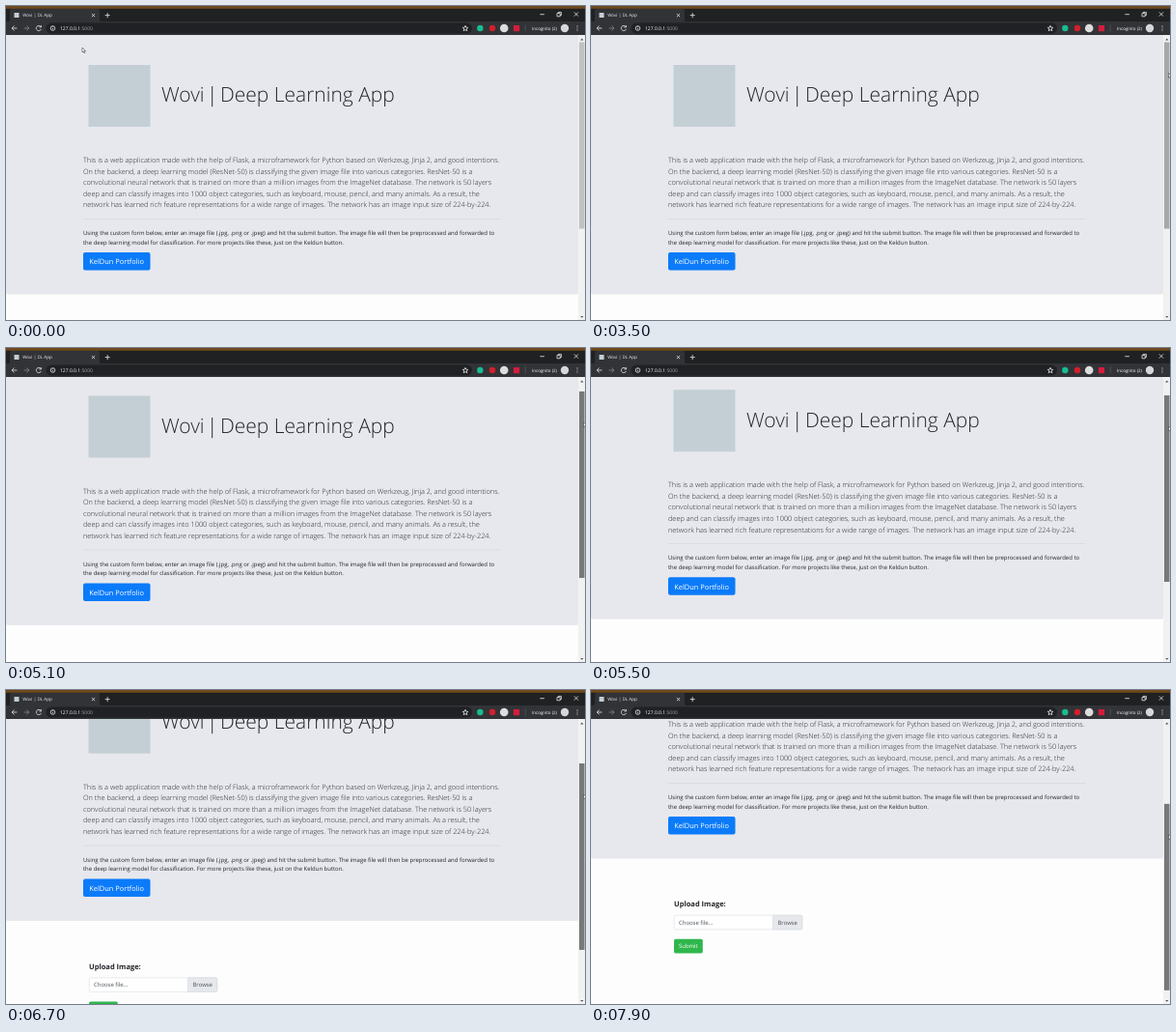
An HTML page for the animation above (8000 ms loop, 600x325 px).

```html
<!DOCTYPE html>
<html lang="en">
<head>
<meta charset="utf-8">
<title>Wovi | DL App</title>
<style>
  html, body { margin: 0; width: 100%; height: 100%; overflow: hidden; background: #fff; }
  svg { display: block; width: 600px; height: 325px; }
  text { font-family: "Open Sans", "Noto Sans", sans-serif; text-rendering: geometricPrecision; fill: #212529; }
  .title { font-size: 21px; font-weight: 300; }
  .lead { font-size: 7.34px; font-weight: 300; }
  .body { font-size: 5.96px; }
  .large { font-size: 7.4px; }
  .label { font-size: 7.5px; font-weight: 700; }
  .tab { font-size: 4.6px; fill: #e8eaed; }
  .url { font-size: 5px; fill: #fff; }
  .mode { font-size: 4.5px; fill: #fff; }
  .url .muted { fill: #9aa0a6; }
  .field { fill: #495057; }
  .white { fill: #fff; }
  .line { fill: none; stroke: #e8eaed; stroke-width: .8; }
  .dim { stroke: #85888c; }
</style>
</head>
<body>
<svg viewBox="0 0 600 325">
  <rect width="600" height="325" fill="#fdfdfd"/>

  <g id="page">
    <path d="M0 0H593V296.5a2 2 0 0 1-2 2H2a2 2 0 0 1-2-2Z" fill="#e7e8ed"/>
    <rect x="85.5" y="61" width="64" height="64" fill="#c3cfd5"/>
    <text class="title" x="161" y="99.3">Wovi<tspan dx="-3"> |</tspan><tspan dx="-3"> Deep Learning App</tspan></text>
    <g class="lead">
      <text x="80" y="162">This is a web application made with the help of Flask, a microframework for Python based on Werkzeug, Jinja 2, and good intentions.</text>
      <text x="80" y="173.6">On the backend, a deep learning model (ResNet-50) is classifying the given image file into various categories. ResNet-50 is a</text>
      <text x="80" y="185.2">convolutional neural network that is trained on more than a million images from the ImageNet database. The network is 50 layers</text>
      <text x="80" y="196.8">deep and can classify images into 1000 object categories, such as keyboard, mouse, pencil, and many animals. As a result, the</text>
      <text x="80" y="208.4">network has learned rich feature representations for a wide range of images. The network has an image input size of 224-by-224.</text>
    </g>
    <rect x="80" y="220.2" width="432.5" height=".6" fill="#d2d3d8"/>
    <g class="body">
      <text x="80" y="237">Using the custom form below, enter an image file (.jpg, .png or .jpeg) and hit the submit button. The image file will then be preprocessed and forwarded to</text>
      <text x="80" y="246.5">the deep learning model for classification. For more projects like these, just on the Keldun button.</text>
    </g>
    <rect x="80" y="255" width="69.5" height="18.5" rx="2" fill="#0b7bf9"/>
    <text class="large white" x="86.3" y="267.4">KelDun Portfolio</text>

    <text class="label" x="86" y="348.4">Upload Image:</text>
    <rect x="86.2" y="357.2" width="132.6" height="14.6" rx="1.6" fill="#fff" stroke="#ced4da" stroke-width=".5"/>
    <path d="M188.5 357.2h28.7a1.6 1.6 0 0 1 1.6 1.6v11.4a1.6 1.6 0 0 1-1.6 1.6h-28.7Z" fill="#e6e8ec" stroke="#ced4da" stroke-width=".5"/>
    <text class="body field" x="91" y="366.8">Choose file...</text>
    <text class="body field" x="193.5" y="366.8">Browse</text>
    <rect x="86" y="381.8" width="29.8" height="14.6" rx="1.6" fill="#2fb74c"/>
    <text class="body white" x="91" y="391.3">Submit</text>
  </g>

  <!-- scrollbar -->
  <rect x="593" y="30" width="7" height="295" fill="#f1f1f1"/>
  <path d="M595.2 35.4h3.2l-1.6-1.9ZM595.2 320.9h3.2l-1.6 1.9Z" fill="#505050"/>
  <rect id="thumb" x="594" y="37.5" width="5.5" height="193"/>

  <!-- browser frame -->
  <rect width="600" height="30" fill="#1f2122"/>
  <rect width="600" height="2.8" fill="#6f4a1d"/>
  <path d="M2 16.5q2 0 2-2V5q0-2 2-2H95q2 0 2 2v9.5q0 2 2 2Z" fill="#323337"/>
  <rect y="16" width="600" height="14" fill="#323337"/>
  <rect x="41.5" y="17.6" width="441.5" height="11" rx="5.5" fill="#202124"/>
  <rect x="8.5" y="7" width="5" height="5" fill="#c3cfd5"/>
  <text class="tab" x="17.2" y="11.2">Wovi | DL App</text>
  <path class="line" d="M88.9 8l3.2 3.2m0-3.2l-3.2 3.2M102.7 9.6h5M105.2 7.1v5"/>
  <path class="line" d="M553.3 8.7h4.6M571 7.6h3.2v3.2H571ZM572.2 7.6v-1.2h3.2v3.2h-1.2M588.8 6.4l4.2 4.2m0-4.2l-4.2 4.2"/>
  <path class="line" d="M11.4 23H6.2m2.4-2.5L6.1 23l2.5 2.5"/>
  <path class="line dim" d="M18.6 23h5.2m-2.4-2.5l2.5 2.5-2.5 2.5"/>
  <path class="line" d="M36 21.4a2.6 2.6 0 1 0 .4 2.5M36.4 20v2h-2"/>
  <circle class="line" cx="48.5" cy="23" r="2.3"/>
  <path class="line" d="M48.5 22.8v1.4M48.5 21.4v.6"/>
  <text class="url" x="56" y="24.8">127.0.0.1<tspan class="muted">:5000</tspan></text>
  <path class="line" d="M476 20.3l.8 1.9 2 .2-1.5 1.3.5 2-1.8-1.1-1.8 1.1.5-2-1.5-1.3 2-.2Z"/>
  <circle cx="491.3" cy="23" r="3.2" fill="#17bd91"/>
  <circle cx="504" cy="23" r="3.2" fill="#d3202c"/>
  <circle cx="516.2" cy="23" r="4.3" fill="#dcdddd"/>
  <rect x="525.9" y="20" width="6.2" height="6.2" fill="#d51c3c"/>
  <path d="M538.2 19.5v7" stroke="#5f6368" stroke-width=".6"/>
  <text class="mode" x="545" y="24.6">Incognito (2)</text>
  <circle cx="579" cy="23" r="4.2" fill="#d5d7da"/>
  <path d="M592 20.9v.01m0 2.09v.01m0 2.09v.01" stroke="#dcdde0" stroke-width="1.1" stroke-linecap="round"/>

  <path id="cursor" d="M0 0V4.9l1.15-1 .8 1.8.9-.4-.8-1.7h1.5Z" fill="#fff" stroke="#222" stroke-width=".5"/>
</svg>
<script>
  const LOOP = 8000, STEP = 100;
  const THUMB_RATIO = 0.648;
  const HOVER_AT = 3100, DRAG_AT = 3800;
  const $ = id => document.getElementById(id);
  const page = $('page'), thumb = $('thumb'), cursor = $('cursor');

  // Monotone cubic through [time, value] points, held at both ends.
  function curve(points) {
    const slope = points.slice(1).map(([t, v], i) => (v - points[i][1]) / (t - points[i][0]));
    const tangent = points.map((_, i) => {
      const a = slope[i - 1] ?? slope[i], b = slope[i] ?? a;
      return a * b > 0 ? 2 * a * b / (a + b) : 0;
    });
    const last = points.length - 1;
    return t => {
      if (t <= points[0][0]) return points[0][1];
      if (t >= points[last][0]) return points[last][1];
      const i = points.findIndex(p => p[0] > t) - 1;
      const [t0, v0] = points[i], [t1, v1] = points[i + 1];
      const d = t1 - t0, u = (t - t0) / d, w = 1 - u;
      return v0 * w * w * (1 + 2 * u) + v1 * u * u * (3 - 2 * u)
        + d * u * w * (tangent[i] * w - tangent[i + 1] * u);
    };
  }

  const scroll = curve([[3900, 0], [4500, 4], [4600, 4], [5100, 11.5], [6000, 28], [7300, 93], [7900, 124]]);
  const cursorX = curve([[200, 79], [700, 92], [2000, 331], [2700, 510], [3200, 598.6]]);
  const cursorY = curve([[200, 43], [700, 46], [2000, 82], [2700, 78], [3300, 69.5]]);

  function draw(now) {
    const t = Math.floor(now % LOOP / STEP) * STEP;
    const y = scroll(t), shift = y * THUMB_RATIO;
    page.setAttribute('transform', `translate(0 ${-y})`);
    thumb.setAttribute('y', 37.5 + shift);
    thumb.setAttribute('fill', t >= DRAG_AT ? '#787878' : t >= HOVER_AT ? '#a8a8a8' : '#c1c1c1');
    cursor.setAttribute('transform', `translate(${cursorX(t)} ${cursorY(t) + shift})`);
  }

  const start = performance.now();
  function tick() {
    draw(performance.now() - start);
    requestAnimationFrame(tick);
  }
  tick();
</script>
</body>
</html>
```
